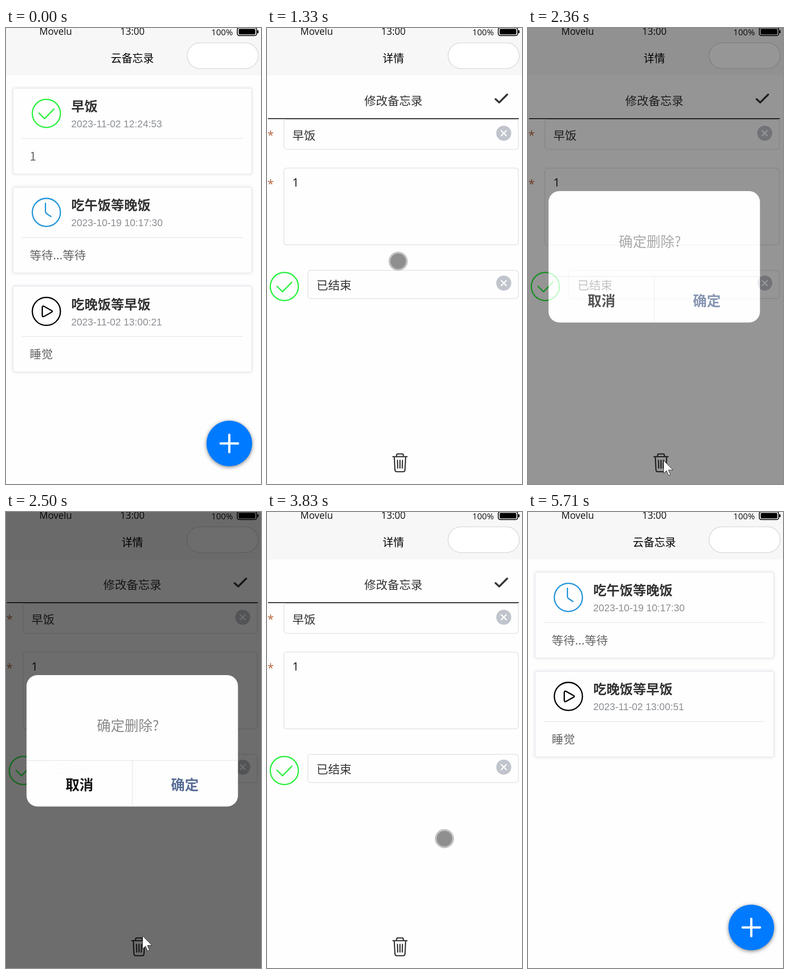
Write an HTML page that moves like this. It is 559 px wide and 1001 px high and loops after 6.13 s.

```html
<!DOCTYPE html>
<html lang="zh">
<head>
<meta charset="utf-8">
<title>云备忘录</title>
<style>
  html, body { margin: 0; height: 100%; overflow: hidden; background: #fefefe; }
  svg { display: block; width: 100vw; height: 100vh; }
  text { font-family: "Noto Sans CJK SC", "Noto Sans CJK", sans-serif; font-size: 25.5px; fill: #333; }
  text.latin { font-family: "Open Sans", "Noto Sans", sans-serif; fill: #111; }
  text.date { font-family: "Liberation Sans", Arial, sans-serif; font-size: 21.6px; fill: #8c8f94; }
  text.head { font-size: 29px; font-weight: 700; }
  text.note { fill: #666; }
  text.star { font-size: 25px; fill: #b5623c; }
  text.button { font-size: 30.5px; font-weight: 700; text-anchor: middle; }
  .line { fill: none; stroke-width: 2.8; stroke-linecap: round; stroke-linejoin: round; }
  .card { fill: #fefefe; stroke: #e9e9f1; stroke-width: 1.5; filter: drop-shadow(0 0 3px rgba(60, 60, 110, .16)); }
  .field { fill: none; stroke: #dfe1e6; stroke-width: 1.6; }
  .add { fill: #007bff; filter: drop-shadow(0 2px 4px rgba(0, 0, 0, .5)); }
</style>
</head>
<body>
<svg viewBox="0 0 559 1001" preserveAspectRatio="none">
  <rect width="559" height="1001" fill="#fefefe"/>
  <g id="before"></g>
  <g id="after"></g>
  <g id="detail">
    <rect y="104" width="559" height="897" fill="#fefefe"/>
    <text x="277" y="168.5" text-anchor="middle">修改备忘录</text>
    <path class="line" d="M501 156l8 7.500 17.500-17.500" stroke="#333" style="stroke-width:4"/>
    <path d="M2 199H552" stroke="#222" stroke-width="1.8"/>
    <rect class="field" x="37" y="201" width="514" height="65.5" rx="6"/>
    <rect class="field" x="37" y="307.5" width="514" height="168.5" rx="6"/>
    <rect class="field" x="89.5" y="532" width="461.5" height="62" rx="6"/>
    <text class="latin star" x="1" y="244">*</text>
    <text class="latin star" x="1" y="350.500">*</text>
    <text x="55.500" y="244.500">早饭</text>
    <text class="latin" x="55.500" y="348">1</text>
    <text x="108.500" y="573.500">已结束</text>
    <g id="extras"></g>
    <path class="line" stroke="#333" style="stroke-width:2.6"
      d="M276 941H307M284 941v-3q0-3 3-3h9q3 0 3 3v3M279 941l1.500 29q.3 4 4 4h14q3.700 0 4-4l1.500-29M286 949l.5 17M291.500 949v17M297 949l-.5 17"/>
  </g>
  <rect width="559" height="104" fill="#f7f7f7"/>
  <text class="latin" x="73" y="15" style="font-size:21px">Movelu</text>
  <text class="latin" x="277" y="15" text-anchor="middle" style="font-size:21px">13:00</text>
  <text class="latin" x="450" y="16" style="font-size:18.6px">100%</text>
  <rect x="507" y="-.5" width="42.500" height="17" rx="4" fill="none" stroke="#000" stroke-width="1.8"/>
  <rect x="510" y="2" width="36.500" height="12" rx="2"/>
  <rect x="550.500" y="5" width="3" height="6.500" rx="1"/>
  <text id="title" x="277" y="75" text-anchor="middle" style="font-size:23.6px;fill:#000"></text>
  <rect x="397" y="32.500" width="156" height="56.500" rx="28.200" fill="#fff" stroke="#d9d9d9" stroke-width="1.6"/>
  <g id="modal">
    <rect width="559" height="1001" opacity=".58"/>
    <rect x="45" y="358" width="463.500" height="288.500" rx="24" fill="#fff"/>
    <path d="M45 545.500H508M277 546V646" stroke="#e6e6e6" stroke-width="1.4"/>
    <text x="199" y="480" style="font-size:30.5px;fill:#888">确定删除?</text>
    <text class="button" x="161" y="610" style="fill:#111">取消</text>
    <text class="button" x="392" y="610" style="fill:#576b95">确定</text>
  </g>
  <g id="cursor">
    <circle id="dot" r="19" fill="#8f8f8f" stroke="#c2c2c2" stroke-width="4"/>
    <path id="arrow" d="M.5 .5V29L7 23 11.500 33.500 15.500 32 11 21.500H21Z" fill="#fff" stroke="#222"/>
    <path id="hand" fill="#fff" stroke="#222" stroke-width="1.1" stroke-linejoin="round"
      d="M-2.500 2.500q2.700-4 5.500 0V13q3.200-3 5.500 1 3.200-3 5.500 1 3.500-2 4.500 2V28q0 7-3.500 12H1q-2-5-5-8L-10 24q-1.500-4 2-4.500 2 0 5.500 4.500ZM3 13v7M8.500 14v6M14 15v5"/>
  </g>
</svg>
<script>
const LOOP = 6130;
const $ = id => document.getElementById(id);

const icons = {
  done: ['#2bf03f', 'M-16-.5l12 12 20.500-21'],
  wait: ['#2596dc', 'M-2-20V-2Q-2 1 1 3L10 9'],
  play: ['#000', 'M-9-8q0-5 4-3L11-2q4 2 0 4L-5 11q-4 2-4-3Z']
};

function icon(name, x, y) {
  const [color, path] = icons[name];
  return `<g class="line" transform="translate(${x} ${y})" stroke="${color}"><circle r="30.800"/><path d="${path}"/></g>`;
}

function list(items) {
  const cards = items.map(([name, head, date, note], i) => `
    <g transform="translate(0 ${i * 217.3})">
      <rect class="card" x="15.500" y="132.500" width="523" height="188" rx="4"/>
      ${icon(name, 88.5, 187.5)}
      <text class="head" x="143" y="183">${head}</text>
      <text class="date" x="143" y="218">${date}</text>
      <path d="M34 242.500H519" stroke="#e6e7f0" stroke-width="1.500"/>
      <text class="note" x="52" y="290.500">${note}</text>
    </g>`);
  return cards.join('') + `
    <circle class="add" cx="489.500" cy="912" r="50"/>
    <path class="line" d="M470.500 912h38M489.500 893v38" stroke="#fff" style="stroke-width:5"/>`;
}

const clear = y => `<circle cx="519" cy="${y}" r="16.500" fill="#c0c4cc"/>
  <path class="line" d="M513.500 ${y - 5.5}l11 11m0-11l-11 11" stroke="#fff" style="stroke-width:2.6"/>`;

const lunch = ['wait', '吃午饭等晚饭', '2023-10-19 10:17:30', '等待...等待'];
const dinner = time => ['play', '吃晚饭等早饭', '2023-11-02 ' + time, '睡觉'];
$('before').innerHTML = list([['done', '早饭', '2023-11-02 12:24:53', '1'], lunch, dinner('13:00:21')]);
$('after').innerHTML = list([lunch, dinner('13:00:51')]);
$('extras').innerHTML = icon('done', 38, 567.5) + clear(231) + clear(560);

// Each leg: start, end, steps, shape, from x, y, to x, y
const legs = [
  [250, 860, 9, 'dot', 513, 959, 285, 177],
  [930, 1490, 8, 'dot', 285, 177, 289, 713],
  [1490, 1840, 5, 'dot', 289, 713, 310, 911],
  [1840, 2110, 4, 'dot', 310, 911, 296, 962],
  [2230, 2500, 4, 'arrow', 296, 955, 299, 930],
  [2500, 2840, 5, 'arrow', 299, 930, 387, 599],
  [2840, 3260, 1, 'hand', 387, 599, 387, 599],
  [3260, 3520, 4, 'dot', 387, 605, 389, 649],
  [3540, 4010, 7, 'dot', 389, 649, 389, 768],
  [4710, 5330, 1, 'arrow', 387, 769, 387, 769],
  [5330, 5710, 6, 'dot', 389, 776, 478, 1030]
];

const ramp = (t, a, b) => Math.min(1, Math.max(0, (t - a) / (b - a)));
const show = (id, on) => $(id).style.display = on ? '' : 'none';

function moveCursor(t) {
  const leg = legs.filter(l => t >= l[0]).pop();
  show('cursor', leg && t < 5710);
  if (!leg) return;
  const [start, end, steps, shape, x0, y0, x1, y1] = leg;
  const p = Math.floor(ramp(t, start, end) * steps + 1e-6) / steps;
  $('cursor').setAttribute('transform', `translate(${x0 + (x1 - x0) * p} ${y0 + (y1 - y0) * p})`);
  for (const id of ['dot', 'arrow', 'hand']) show(id, id === shape);
}

function draw(t) {
  const editing = t >= 930 && t < 4780;
  show('before', t < 1400);
  show('detail', editing);
  show('after', t >= 5010);
  const slide = 559 * (1 - ramp(t, 960, 1320)) ** 3;
  $('detail').setAttribute('transform', `translate(${slide} 0)`);
  $('title').textContent = editing ? '详情' : '云备忘录';
  const shown = 1 - (1 - ramp(t, 2210, 2540)) ** 2;
  const opacity = shown * (1 - ramp(t, 2890, 3150));
  show('modal', opacity > 0);
  $('modal').setAttribute('opacity', opacity);
  moveCursor(t);
}

const origin = performance.now();
function tick() {
  draw((performance.now() - origin) % LOOP);
  requestAnimationFrame(tick);
}
tick();
</script>
</body>
</html>
```
